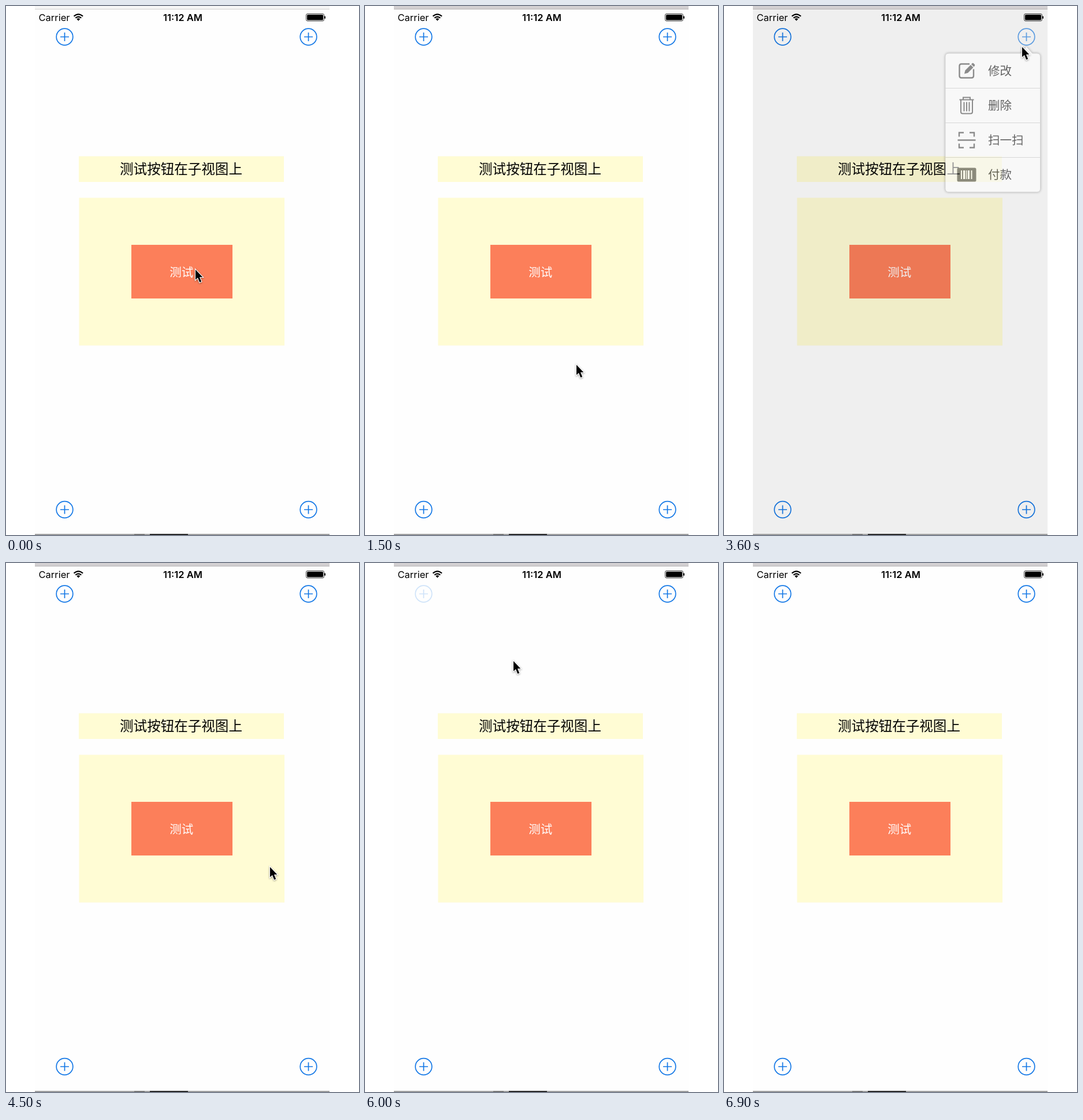
An HTML page that plays this animation: 611x917 px, repeating every 7.2 s.

```html
<!DOCTYPE html>
<html lang="zh">
<head>
<meta charset="utf-8">
<style>
html, body { margin: 0; width: 100%; height: 100%; overflow: hidden; background: #fff; }
svg { display: block; width: 611px; height: 917px; }
text { font-family: "Noto Sans CJK SC", "Noto Sans CJK", sans-serif; }
.status { font-family: Inter, sans-serif; font-size: 16.5px; }
.add { fill: none; stroke: #1478e6; stroke-width: 1.7; }
.menu { filter: drop-shadow(0 0 2px rgba(0, 0, 0, .45)); }
.icon { fill: none; stroke: #444; stroke-width: 2.4; }
#cursor { filter: drop-shadow(0 1.5px 1.5px rgba(0, 0, 0, .4)); }
</style>
</head>
<body>
<svg id="stage" viewBox="0 0 611 917"></svg>
<script>
const LOOP = 7200, STEP = 300, FADE = 250;

// Each menu hangs from an anchor point; `up` means the arrow points upwards.
const menus = [
  { left: 222, tip: 304, y: 521, up: true, open: 340, close: 1230 },
  { left: 62, tip: 101.5, y: 604, up: false, open: 2120, close: 2740, button: [101.5, 873] },
  { left: 383, tip: 523.5, y: 82, up: true, open: 3455, close: 4230, button: [523.5, 53.5] },
  { left: 383, tip: 523.5, y: 604, up: false, open: 4655, close: 5730, button: [523.5, 873] },
  { left: 62, tip: 101.5, y: 82, up: true, open: 6040, close: 6630, button: [101.5, 53.5] },
];

// Cursor path: time, x, y
const path = [
  [0, 328, 457], [600, 328, 457], [1200, 362, 612], [1500, 366, 622],
  [1800, 141, 880], [2100, 102, 872], [2400, 196, 863], [2700, 300, 494],
  [3300, 519, 54], [3600, 516, 71], [3900, 495, 240], [4200, 468, 470],
  [4500, 457, 527], [4800, 520, 868], [5100, 508, 845], [5700, 330, 320],
  [6000, 257, 170], [6300, 104, 54], [6600, 140, 4],
];

const rect = (x, y, w, h, fill, rx = 0) =>
  `<rect x="${x}" y="${y}" width="${w}" height="${h}" rx="${rx}" fill="${fill}"/>`;
const text = (x, y, size, label, extra = '') =>
  `<text x="${x}" y="${y}" font-size="${size}" ${extra}>${label}</text>`;
const stroke = (d, extra = '') => `<path class="icon" d="${d}" ${extra}/>`;

// Icons are drawn around their own centre.
const icons = [
  stroke('M5-12H-9Q-12.500-12-12.500-8.500V8.500Q-12.500 12-9 12H8.500Q12 12 12 8.500V-3') +
    '<path fill="#444" d="M-4 5L-2.500-1L7-10.500L11.500-6L2 3.500ZM8-11.500L10-13.500Q11-14 12-13L14-11Q14.500-10 14-9L12.500-7Z"/>',
  stroke('M-12.500-10H12.500M-6-10V-14H6V-10M-10-10V11Q-10 14-7 14H7Q10 14 10 11V-10M-4.500-6V10M0-6V10M4.500-6V10',
    'stroke-width="2" style="stroke-width:2"'),
  stroke('M-15.500 0H15.500M-13-6V-13H-5M5-13H13V-6M-13 6V13H-5M5 13H13V6'),
  rect(-16.5, -12, 33, 24, '#444', 2.5) +
    [[-10, 2], [-6, 3.5], [-1, 1.5], [2, 3], [7.5, 2]].map(([x, w]) => rect(x, -7.5, w, 15, '#fff')).join(''),
];
const labels = ['修改', '删除', '扫一扫', '付款'];

function menuMarkup({ left, tip, y, up }, i) {
  const right = left + 164.500, bottom = y + 240.500, r = 6;
  const topArrow = up ? `H${tip - 10}L${tip} ${y - 12}L${tip + 10} ${y}` : '';
  const bottomArrow = up ? '' : `H${tip + 10}L${tip} ${bottom + 12}L${tip - 10} ${bottom}`;
  const outline = `M${left + r} ${y}${topArrow}H${right - r}q${r} 0 ${r} ${r}V${bottom - r}q0 ${r} ${-r} ${r}` +
    `${bottomArrow}H${left + r}q${-r} 0 ${-r} ${-r}V${y + r}q0 ${-r} ${r} ${-r}z`;
  const rows = labels.map((label, n) => {
    const middle = y + 30.500 + n * 60;
    return (n ? rect(left, middle - 30.500, 164.500, 1, '#c6c6c6') : '') +
      `<g transform="translate(${left + 37} ${middle})">${icons[n]}</g>` +
      text(left + 74, middle + 7.800, 20.5, label);
  }).join('');
  return `<g id="menu${i}" class="menu"><path d="${outline}" fill="#fff" stroke="#bbb" stroke-width=".8"/>${rows}</g>`;
}

const addButton = ({ button: [x, y] }, i) =>
  `<path id="add${i}" class="add" transform="translate(${x} ${y})"
    d="M-14.300 0a14.300 14.300 0 1 0 28.600 0a14.300 14.300 0 1 0-28.600 0M-7.500 0H7.500M0-7.500V7.500"/>`;

const wifi = '<g fill="none" stroke="#000" stroke-width="2.2">' +
  '<path d="M117.500 17.800Q125.300 10.800 133.100 17.800M120.300 20.800Q125.300 16.300 130.300 20.800"/></g>' +
  '<path d="M122.300 22.500Q125.300 20 128.300 22.500L125.300 25.700Z"/>';
const battery = '<rect x="519.500" y="13.500" width="31" height="12.500" rx="2.500" fill="none" stroke="#222" stroke-width=".9"/>' +
  rect(521, 15, 28, 9.5, '#000', 1.5) + rect(551.3, 17.5, 1.7, 4.5, '#000', 0.8);

const centered = 'text-anchor="middle"';
document.getElementById('stage').innerHTML =
  rect(50, 6, 510, 909, '#fefefe') +
  `<text class="status" x="56.500" y="25.700">Carrier</text>` + wifi +
  `<text class="status" x="306" y="25.700" font-weight="600" ${centered}>11:12 AM</text>` + battery +
  menus.map((m, i) => m.button ? addButton(m, i) : '').join('') +
  rect(126, 260.5, 355, 44.5, '#fffcd4') +
  text(303, 291.3, 23.55, '测试按钮在子视图上', centered) +
  rect(126.5, 332.5, 355.5, 256, '#fffcd4') +
  rect(217, 414, 175, 93, '#fc7f5a') +
  text(303.7, 468.5, 20.5, '测试', centered + ' fill="#fff"') +
  '<rect id="dim" x="50" y="6" width="510" height="909"/>' +
  menus.map(menuMarkup).join('') +
  '<rect id="bar" x="50" width="510" height="5"/><rect id="barLine" x="50" y="5" width="510" height="1"/>' +
  rect(50, 915, 510, 2, '#a0a0a0') + rect(222, 915, 18, 2, '#777') + rect(249, 915, 66, 2, '#282828') +
  '<path id="cursor" d="M0 0V17.500L4 14L7.200 22L10.200 20.700L7 13H12.300Z" stroke="#fff" stroke-width="2.200" paint-order="stroke"/>';

const el = id => document.getElementById(id);
const clamp = v => Math.max(0, Math.min(1, v));

function cursorAt(t) {
  const next = path.findIndex(p => p[0] > t);
  if (next < 0) return path[path.length - 1].slice(1);
  const [t0, x0, y0] = path[next - 1], [t1, x1, y1] = path[next];
  const k = (t - t0) / (t1 - t0);
  return [x0 + (x1 - x0) * k, y0 + (y1 - y0) * k];
}

function render(t) {
  let dim = 0;
  menus.forEach((m, i) => {
    const shown = clamp((t - m.open) / FADE) * clamp(1 - (t - m.close) / FADE);
    el('menu' + i).setAttribute('opacity', shown);
    dim = Math.max(dim, shown);
    if (m.button) {
      const pressed = t > m.open - 60;
      el('add' + i).setAttribute('opacity', pressed ? 0.2 + 0.8 * clamp((t - m.open) / FADE) : 1);
    }
  });
  el('dim').setAttribute('opacity', dim * 0.1);

  const focused = t >= 600;
  el('bar').setAttribute('fill', focused ? '#d3d0d2' : '#f6f6f6');
  el('barLine').setAttribute('fill', focused ? '#b5b3b4' : '#d0d0d0');

  el('cursor').setAttribute('transform', `translate(${cursorAt(t)})`);
  el('cursor').setAttribute('visibility', t < 6900 ? 'visible' : 'hidden');
}

const start = performance.now();
function tick() {
  const t = (performance.now() - start) % LOOP;
  render(Math.floor(t / STEP) * STEP);
  requestAnimationFrame(tick);
}
tick();
</script>
</body>
</html>
```
